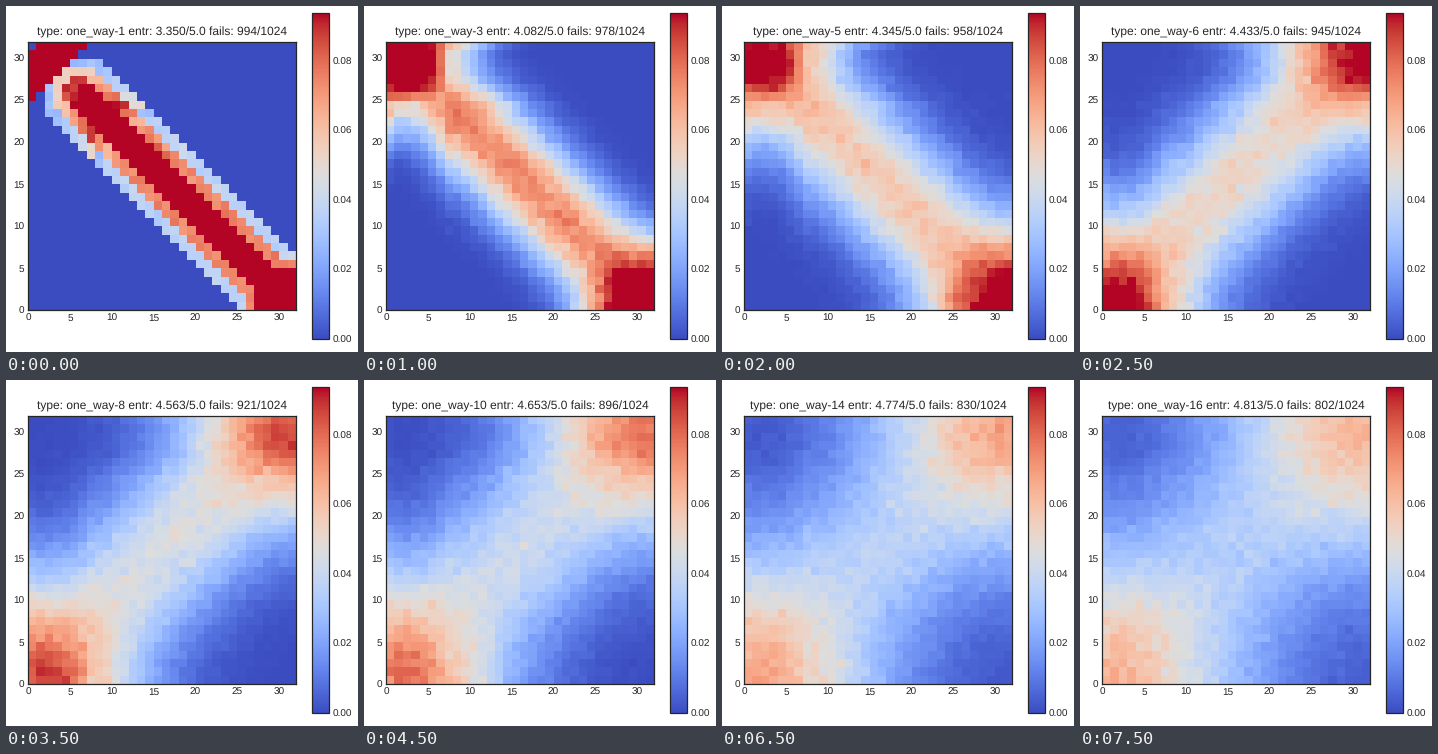
A matplotlib script for the animation above (8000 ms loop, 352 by 346 pixels).

```python
import numpy as np
import matplotlib.pyplot as plt
from matplotlib.animation import FuncAnimation

W, H, DPI = 352, 346, 64
CARDS = 32
PACKETS = range(2, 8)
TRIALS = 10000


def pt(px):
    return px * 72 / DPI


def overhand():
    """Chance of each card reaching each place in one overhand shuffle."""
    P = np.zeros((CARDS, CARDS))
    cut = np.zeros(CARDS + 1)
    cut[0] = 1
    for t in range(CARDS):
        for size in PACKETS:
            m = min(size, CARDS - t)
            p = cut[t] / len(PACKETS)
            for j in range(m):
                P[t + j, CARDS - t - m + j] += p
            cut[t + m] += p
    return P


STEP = overhand()


def sample(passes):
    """Card frequencies after some passes, as counted over many trials."""
    rng = np.random.default_rng(passes)
    P = np.linalg.matrix_power(STEP, passes)
    P /= P.sum(axis=1, keepdims=True)
    return np.array([rng.multinomial(TRIALS, row) for row in P]).T / TRIALS


def entropy(freq):
    """Mean entropy of a card's place, in bits."""
    p = freq[freq > 0]
    return -(p * np.log2(p)).sum() / CARDS


def fails(passes):
    return round(np.interp(passes, [1, 4, 10, 12, 16],
                           [994, 970, 896, 859, 802]))


plt.rcParams.update({
    "font.family": "Liberation Sans", "text.hinting": "none",
    "text.color": ".15", "axes.edgecolor": ".15",
    "xtick.color": ".15", "ytick.color": ".15",
    "axes.linewidth": pt(1.25), "axes.titlesize": pt(12),
    "xtick.labelsize": pt(10), "ytick.labelsize": pt(10),
    "xtick.major.size": 0, "ytick.major.size": 0,
    "xtick.major.pad": pt(3.5), "ytick.major.pad": pt(3.5),
})

fig = plt.figure(figsize=(W / DPI, H / DPI), dpi=DPI, facecolor="white")


def panel(left, top, right, bottom):
    return fig.add_axes([left / W, 1 - bottom / H,
                         (right - left) / W, (bottom - top) / H])


ax = panel(22, 36, 290, 304)
cax = panel(306, 7, 323, 333)

mesh = ax.pcolormesh(sample(1), cmap="coolwarm", vmin=0, vmax=3 / CARDS)
ax.set(xlim=(0, CARDS), ylim=(0, CARDS),
       xticks=range(0, 31, 5), yticks=range(0, 31, 5))
title = ax.set_title("", pad=pt(6))
fig.colorbar(mesh, cax=cax, ticks=np.arange(5) * 0.02, format="%.2f")


def update(i):
    n = i + 1
    freq = sample(n)
    mesh.set_array(freq)
    title.set_text(f"type: one_way-{n} entr: {entropy(freq):.3f}/5.0 "
                   f"fails: {fails(n)}/{CARDS ** 2}")
    return mesh, title


anim = FuncAnimation(fig, update, frames=16, interval=500,
                     repeat=True, repeat_delay=0, blit=False)
plt.show()
```
